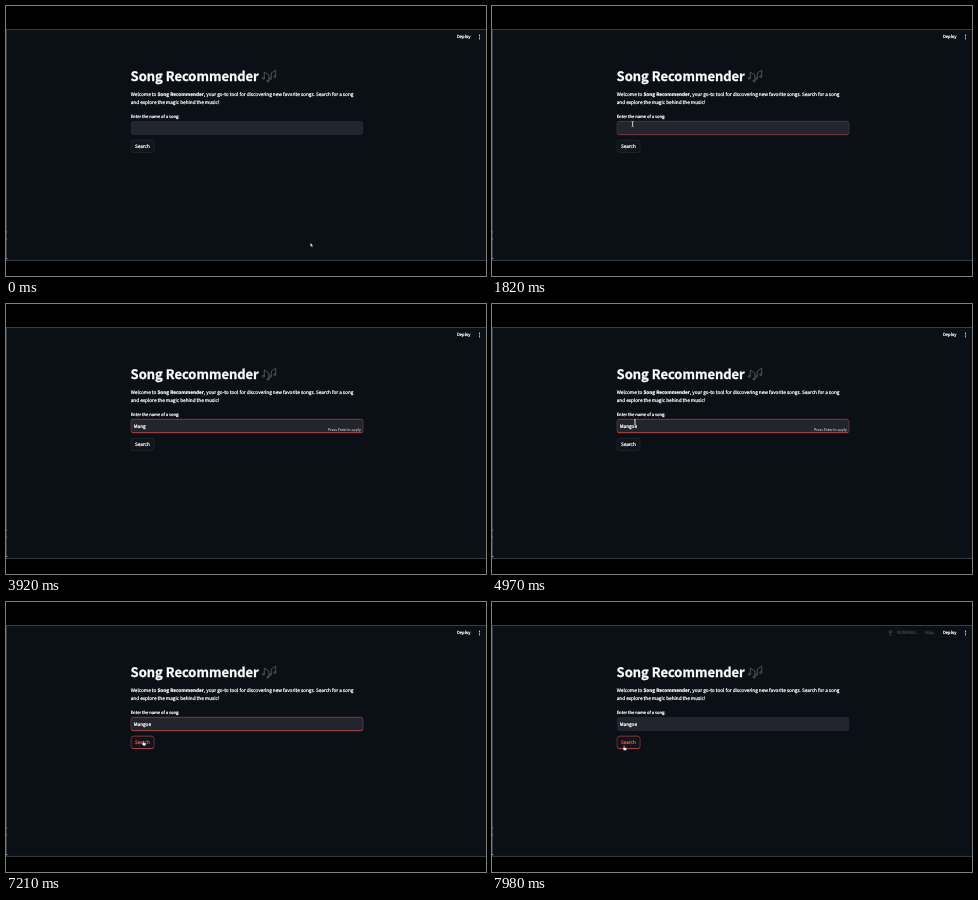
An HTML page that plays this animation: 480 px wide and 270 px high, repeating every 8 s.

```html
<!DOCTYPE html>
<html lang="en">
<head>
<meta charset="utf-8">
<title>Song Recommender</title>
<style>
  html, body { margin: 0; width: 100%; height: 100%; overflow: hidden; background: #000; }
  svg { display: block; width: 480px; height: 270px; }
  text {
    font: 4.7px "Noto Sans CJK JP", "Noto Sans CJK SC", "Noto Sans", sans-serif;
    fill: #fff;
    stroke: #fff;
    stroke-width: .22;
    text-rendering: geometricPrecision;
    white-space: pre;
  }
  .bold { font-weight: 700; }
  text.title { font-size: 12.95px; font-weight: 700; stroke-width: .3; }
  text.small { font-size: 4.13px; }
  text.hint { font-size: 3.55px; fill: #b4b5ba; stroke: #b4b5ba; stroke-width: .12; }
  text.red { fill: #ff4b4b; stroke: #ff4b4b; }
  .cursor { fill: #fff; stroke: #000; stroke-width: .4; stroke-linejoin: round; }
</style>
</head>
<body>
<svg viewBox="0 0 480 270">
  <linearGradient id="rim" x2="0" y2="1">
    <stop offset="0" stop-color="#b04145"/>
    <stop offset=".1" stop-color="#78343a"/>
    <stop offset=".85" stop-color="#78343a"/>
    <stop offset="1" stop-color="#ff5850"/>
  </linearGradient>

  <rect width="480" height="270" fill="#000"/>
  <rect y="23" width="480" height="232" fill="#0b0f16"/>
  <path d="M0 23.5H480M0 254.4H480" stroke="#3c4447" stroke-width=".9"/>
  <path d="M.5 24V254" stroke="#343b3e"/>
  <path d="M0 226h1M0 233h1M0 252.5h1.5" stroke="#8b9094" stroke-width=".9"/>

  <g id="running">
    <g fill="none" stroke="#fafafa" stroke-width=".9" stroke-linecap="round">
      <circle cx="398.4" cy="28.4" r=".4"/>
      <path d="M396.3 30h4M398.4 30v2.2M397.4 33.4l1-1.2 1 1.2"/>
    </g>
    <text class="small" x="405" y="32.4">RUNNING...</text>
    <text class="small" x="433" y="32.4">Stop</text>
  </g>
  <text class="small" x="451" y="32.4">Deploy</text>
  <path d="M473.5 29.2v0M473.5 31v0M473.5 32.8v0" stroke="#fff" stroke-width="1.2" stroke-linecap="round"/>

  <text class="title" x="124.6" y="74.9">Song Recommender</text>
  <g fill="#10161a" stroke="#747b7e" stroke-width=".6" stroke-linejoin="round">
    <path d="M258.3 72V66l4.6 3v6M265.3 72v-5l4.4-2.8V70" fill="none"/>
    <g id="heads">
      <ellipse cx="257.4" cy="72.3" rx="1.1" ry=".9"/>
      <ellipse cx="262" cy="75.2" rx="1.1" ry=".9"/>
      <ellipse cx="264.4" cy="72.6" rx="1.1" ry=".9"/>
      <ellipse cx="268.8" cy="70.6" rx="1.1" ry=".9"/>
    </g>
  </g>

  <text x="124.7" y="89.9">Welcome to <tspan class="bold">Song Recommender</tspan>, your go-to tool for discovering new favorite songs. Search for a song</text>
  <text x="124.7" y="98.4">and explore the magic behind the music!</text>
  <text class="small" x="124.7" y="111.7">Enter the name of a song:</text>

  <rect x="124.8" y="115.1" width="232.4" height="13.9" rx="2.4" fill="#22242e"/>
  <rect id="focus" x="125" y="115.3" width="232" height="13.4" rx="2.3" fill="none" stroke="url(#rim)" stroke-width=".7"/>
  <text id="typed" x="127.7" y="123.7"></text>
  <path id="caret" d="M132.2 119.2v5.6" stroke="#fafafa" stroke-width=".6"/>
  <text id="hint" class="hint" x="322" y="126.7">Press Enter to apply</text>

  <rect x="125.1" y="134.2" width="22.9" height="12.4" rx="2.4" fill="#10141b" stroke="#2b2f36" stroke-width=".6"/>
  <text x="128.9" y="142">Search</text>
  <g id="hover">
    <rect x="125.1" y="134.2" width="22.9" height="12.4" rx="2.4" fill="#10141b" stroke="url(#rim)" stroke-width=".7"/>
    <text class="red" x="128.9" y="142">Search</text>
  </g>

  <g id="mouse">
    <path id="arrow" class="cursor" d="M-1.2-2.2v4l1-.8.7 1.5.8-.4-.7-1.4h1.3z"/>
    <path id="beam" d="M-1-2.7q1 0 1 .8v3.8q0 .8-1 .8M1-2.7q-1 0-1 .8v3.8q0 .8 1 .8" fill="none" stroke="#e8e8ea" stroke-width=".6"/>
    <path id="hand" class="cursor" d="M-1-2.2q.5-.6.9 0v1.7l1.6.3q.7.2.6.9l-.4 1.8h-2.5l-1.4-1.9q0-.7.8-.3z"/>
  </g>
</svg>
<script>
const LOOP = 8000, TICK = 70;
const WORD = "Mangoe", TYPE_START = 2660, TYPE_SPAN = 1540;
const $ = id => document.getElementById(id);

const ramp = (t, from, span) => Math.min(1, Math.max(0, (t - from) / span));
const pulse = (t, from, span) => Math.sin(Math.PI * ramp(t, from, span));
const show = (id, opacity) => $(id).setAttribute("opacity", +opacity);

const home = { x: 305.5, y: 239 };
const moves = [
  { at: 630, span: 210, x: 138, y: 109 },
  { at: 1120, span: 280, x: 140.6, y: 118 },
  { at: 4620, span: 280, x: 143, y: 118 },
  { at: 5110, span: 280, x: 139, y: 140.3 },
  { at: 7140, span: 420, x: 132.7, y: 146 }
];

function mouseAt(t) {
  return moves.reduce((p, m) => {
    const k = ramp(t, m.at, m.span);
    return { x: p.x + (m.x - p.x) * k, y: p.y + (m.y - p.y) * k };
  }, home);
}

// Keystrokes come slightly faster towards the end of the word.
const keyTime = i => TYPE_START + TYPE_SPAN * (i / (WORD.length - 1)) ** .8;

function draw(time) {
  const t = Math.floor((time % LOOP) / TICK) * TICK;

  show("focus", ramp(t, 1610, 350) - ramp(t, 7770, 210));
  show("hint", ramp(t, 2590, 280) - ramp(t, 6300, 210));
  show("hover", ramp(t, 5250, 280));
  show("running", .2 * (pulse(t, 6300, 350) + ramp(t, 7770, 210)));

  $("typed").textContent = [...WORD].filter((_, i) => keyTime(i) <= t).join("");
  show("caret", t >= TYPE_START && t < keyTime(1));

  const { x, y } = mouseAt(t);
  const shape = y > 133 && y < 148 ? "hand" : y > 113 && y < 130 ? "beam" : "arrow";
  const hidden = t >= TYPE_START && t < 4970;
  $("mouse").setAttribute("transform", `translate(${x} ${y})`);
  for (const id of ["arrow", "beam", "hand"]) show(id, !hidden && id === shape);
}

const start = performance.now();
function frame() {
  draw(performance.now() - start);
  requestAnimationFrame(frame);
}
frame();
</script>
</body>
</html>
```
